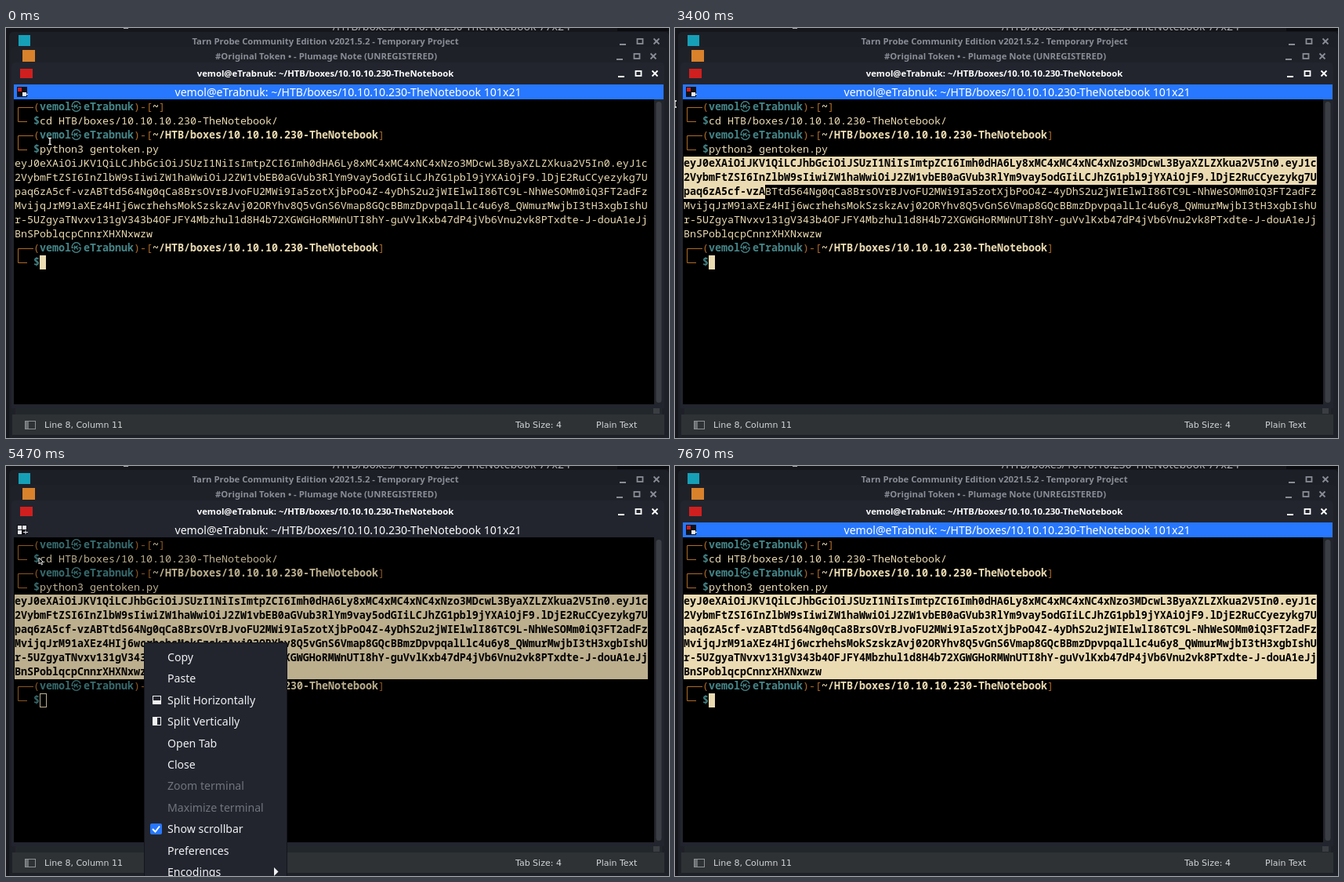
Animation of 846x523 px, one loop 8 s. Source, as an HTML page with a canvas:

```html
<!DOCTYPE html>
<html lang="en">
<head>
<meta charset="utf-8">
<title>Terminal selection</title>
<style>
html, body { margin: 0; width: 100%; height: 100%; overflow: hidden; background: #15171d; }
canvas { display: block; }
</style>
</head>
<body>
<canvas id="stage" width="846" height="523"></canvas>
<script>
const ctx = document.getElementById('stage').getContext('2d');
const LOOP = 8000, TICK = 1000 / 15;
const COLS = 101, CELL = 8, ROW = 18, LEFT = 11, TOP = 92;
const MONO = '"Noto Sans Mono", "DejaVu Sans Mono", monospace';
const SANS = '"Noto Sans", "Open Sans", sans-serif';
const STATUS = '11px "DejaVu Sans", sans-serif';
const CJK = '13.333px "Noto Sans CJK KR", "Noto Sans CJK JP", sans-serif';
const BLUE = '#2777ff', CHROME = '#22252e';

const USER = 'vemol', HOST = 'eTrabnuk', DIR = '~/HTB/boxes/10.10.10.230-TheNotebook';
const TITLE = `${USER}@${HOST}: ${DIR}`;
const TOKEN = [
  'eyJ0eXAiOiJKV1QiLCJhbGciOiJSUzI1NiIsImtpZCI6Imh0dHA6Ly8xMC4xMC4xNC4xNzo3MDcwL3ByaXZLZXkua2V5In0.eyJ1c',
  '2VybmFtZSI6InZlbW9sIiwiZW1haWwiOiJ2ZW1vbEB0aGVub3RlYm9vay5odGIiLCJhZG1pbl9jYXAiOjF9.lDjE2RuCCyezykg7U',
  'paq6zA5cf-vzABTtd564Ng0qCa8BrsOVrBJvoFU2MWi9Ia5zotXjbPoO4Z-4yDhS2u2jWIElwlI86TC9L-NhWeSOMm0iQ3FT2adFz',
  'MvijqJrM91aXEz4HIj6wcrhehsMokSzskzAvj02ORYhv8Q5vGnS6Vmap8GQcBBmzDpvpqalLlc4u6y8_QWmurMwjbI3tH3xgbIshU',
  'r-5UZgyaTNvxv131gV343b4OFJFY4Mbzhul1d8H4b72XGWGHoRMWnUTI8hY-guVvlKxb47dP4jVb6Vnu2vk8PTxdte-J-douA1eJj',
  'BnSPoblqcpCnnrXHXNxwzw'
];
const MENU = ['Copy', 'Paste', 'Split Horizontally', 'Split Vertically', 'Open Tab', 'Close',
  'Zoom terminal', 'Maximize terminal', 'Show scrollbar', 'Preferences', 'Encodings'];

const ACTIVE = { text: '#ebdbb2', line: '#ad6b29', name: '#458588' };
const IDLE = { text: '#bcaf8e', line: '#8a5621', name: '#376a6d' };

// Keys are [tick, x, y]; positions hold outside the ends.
const POINTER = [
  [4, 56, 144.5], [14, 24, 123.5], [21, 24, 123.5], [22, 17, 120.5], [23, -30, 80],
  [50, -30, 80], [51, 0, 97], [61, 48, 132.5], [64, 48, 132.5], [66, 52, 136.5],
  [67, 60, 139.5], [74, 60, 139.5], [80, 41, 114], [81, 41, 114], [82, 42, 117],
  [84, 42, 117], [88, 65, 129], [95, 65, 129], [96, 67, 132.5], [99, 67, 132.5],
  [102, 71, 108], [109, 14, -14]
];
// Keys are [tick, row, column] of the moving end of the second selection.
const DRAG = [
  [44, 4.2, 0], [48, 5.3, 11], [50, 5.3, 11], [51, 6.6, 13], [61, 8.3, 22], [64, 8.3, 22], [66, 8.6, 23]
];

function at(keys, k) {
  if (k <= keys[0][0]) return keys[0].slice(1);
  for (let i = 1; i < keys.length; i++) {
    const [t0, x0, y0] = keys[i - 1], [t1, x1, y1] = keys[i];
    if (k <= t1) {
      const f = (k - t0) / (t1 - t0);
      return [x0 + (x1 - x0) * f, y0 + (y1 - y0) * f];
    }
  }
  return keys[keys.length - 1].slice(1);
}

function rect(x, y, w, h, color) {
  ctx.fillStyle = color;
  ctx.fillRect(x, y, w, h);
}

function round(x, y, w, h, r, color) {
  ctx.fillStyle = color;
  ctx.beginPath();
  ctx.roundRect(x, y, w, h, r);
  ctx.fill();
}

function text(str, x, y, font, color, align = 'left') {
  ctx.font = font;
  ctx.fillStyle = color;
  ctx.textAlign = align;
  ctx.fillText(str, x, y);
}

function path(points, color, width = 1) {
  ctx.strokeStyle = color;
  ctx.lineWidth = width;
  ctx.beginPath();
  points.forEach(([x, y]) => ctx.lineTo(x, y));
  ctx.stroke();
}

function frameBox(x, y, w, h, color, width = 1) {
  ctx.strokeStyle = color;
  ctx.lineWidth = width;
  ctx.strokeRect(x, y, w, h);
}

function windowButtons(x, y, color) {
  rect(x - 4, y + 3, 8, 2, color);
  frameBox(x + 18.5, y - 3, 7, 6, color, 1.8);
  path([[x + 39.5, y - 3.5], [x + 46.5, y + 3.5]], color, 1.8);
  path([[x + 46.5, y - 3.5], [x + 39.5, y + 3.5]], color, 1.8);
}

function drawBackWindows() {
  rect(0, 0, 846, 523, '#14161b');
  rect(780, 0, 66, 4, '#0b0c0f');
  text(DIR + ' 77x24', 720, 3, '14.1px ' + SANS, '#a9abb0', 'right');
  rect(150, 0, 6, 1, '#a9abb0');

  round(4, 5, 842, 530, [5, 5, 0, 0], '#1d1f27');
  rect(16, 9, 15, 14, '#16a0b8');
  text('Tarn Probe Community Edition v2021.5.2 - Temporary Project', 407.5, 20.5, 'bold 11.3px ' + SANS, '#8a8d95', 'center');
  windowButtons(787, 17, '#8a8d95');

  round(6, 24, 838, 510, [5, 5, 0, 0], '#1f2129');
  rect(21, 28, 16, 15, '#d9822b');
  text('#Original Token • - Plumage Note (UNREGISTERED)', 408.5, 40, 'bold 11.3px ' + SANS, '#8a8d95', 'center');
  windowButtons(783, 36, '#8a8d95');

  rect(12, 484, 825, 10, '#22272b');
  rect(826, 484, 8, 8, '#3a3e42');
  rect(8, 493, 832, 26, '#2e3235');
  frameBox(24.5, 501.5, 13, 10, '#8c9093');
  rect(25, 502, 4, 9, '#6d7174');
  text('Line 8, Column 11', 49, 510, STATUS, '#d3d5d6');
  text('Tab Size: 4', 650, 510, STATUS, '#d3d5d6');
  text('Plain Text', 753, 510, STATUS, '#d3d5d6');
}

function drawTerminalFrame(focused) {
  round(7, 44, 833, 441, [5, 5, 0, 0], CHROME);
  rect(18, 52, 16, 12, '#d01f1f');
  text(TITLE, 407.5, 62, 'bold 11.3px ' + SANS, '#ffffff', 'center');
  windowButtons(785, 58, '#ffffff');

  rect(10, 72, 829, 19, focused ? BLUE : CHROME);
  const tiles = focused ? ['#d01f1f', '#101218', '#101218', '#e8eaf0'] : ['#e8eaf0', '#e8eaf0', '#e8eaf0', '#101218'];
  rect(14, 75, 13, 13, '#101218');
  tiles.forEach((color, i) => rect(15 + (i % 2) * 6, 76 + (i >> 1) * 6, 5, 5, color));
  path([[22, 84.5], [28, 84.5]], '#e8eaf0');
  path([[25, 82], [25, 87]], '#e8eaf0');
  text(TITLE + ' 101x21', 436.5, 87, '14.1px ' + SANS, '#ffffff', 'center');

  rect(10, 91, 817, 389, '#000000');
  rect(827, 91, 12, 389, '#22252b');
  round(829.5, 94, 7, 384, 3.5, '#3b3e44');
}

function cellText(str, row, col, color, weight = 'normal') {
  text(str, LEFT + col * CELL, TOP + row * ROW + 13, `${weight} 13.333px ${MONO}`, color);
}

function prompt(row, dir, pal) {
  const y = TOP + row * ROW + 9.5;
  path([[35, y], [15.5, y], [15.5, y + ROW], [27, y + ROW]], pal.line);
  const parts = [['(', 3], [USER, 4, 1], [HOST, 11, 1], [')-[', 19], [dir, 22, 2], [']', 22 + dir.length]];
  for (const [str, col, kind] of parts)
    cellText(str, row, col, kind === 1 ? pal.name : kind ? pal.text : pal.line, kind ? 'bold' : 'normal');
  text('㉿', LEFT + 9 * CELL, TOP + row * ROW + 13, CJK, pal.name);
  cellText('$', row + 1, 3, pal.name, 'bold');
}

function selection(k) {
  if (k >= 5 && k < 42) {
    const [x, y] = at(POINTER, Math.min(k, 14));
    return [y > 137.5 ? 9 : 8, Math.floor((x + 135 - LEFT) / CELL), 9, COLS];
  }
  if (k >= 67) return [4, 0, 9, COLS];
  if (k >= 45) {
    const [row, col] = at(DRAG, k);
    return [4, 0, Math.floor(row), Math.round(col)];
  }
  return null;
}

function drawSelection([r0, c0, r1, c1], pal) {
  for (let r = r0; r <= r1; r++) {
    const from = r === r0 ? c0 : 0, to = r === r1 ? c1 : COLS;
    ctx.save();
    ctx.beginPath();
    ctx.rect(LEFT + from * CELL, TOP + r * ROW, (to - from) * CELL, ROW);
    ctx.clip();
    rect(LEFT, TOP + r * ROW, COLS * CELL, ROW, pal.text);
    cellText(TOKEN[r - 4], r, 0, '#000000', '600');
    ctx.restore();
  }
}

function drawTerminal(k, focused) {
  const pal = focused ? ACTIVE : IDLE;
  prompt(0, '~', pal);
  cellText('cd HTB/boxes/10.10.10.230-TheNotebook/', 1, 4, pal.text);
  prompt(2, DIR, pal);
  cellText('python3 gentoken.py', 3, 4, pal.text);
  TOKEN.forEach((line, i) => cellText(line, 4 + i, 0, pal.text));
  prompt(10, DIR, pal);
  const range = selection(k);
  if (range) drawSelection(range, pal);
  if (!focused) frameBox(43.5, 290.5, 8, 17, pal.text);
  else if (k < 106 || k >= 115) rect(43, 290, 8, 18, pal.text);
}

function drawMenu(hover) {
  rect(176, 225, 183, 298, '#14161c');
  rect(177, 226, 181, 297, CHROME);
  if (hover >= 0) rect(178, 230.5 + hover * 27.4, 179, 27, BLUE);
  MENU.forEach((label, i) => {
    const off = i === 6 || i === 7;
    text(label, 206, 249 + i * 27.4, '14.1px ' + SANS, off ? '#70747d' : '#f0f1f3');
  });
  for (const [y, w, h] of [[293, 10, 6], [320, 5, 10]]) {
    rect(187, y, 11, 11, '#f0f1f3');
    rect(w > 5 ? 188 : 193, y + 1, w > 5 ? 9 : 4, w > 5 ? h - 1 : 9, CHROME);
  }
  round(184, 456, 15, 14, 2, BLUE);
  path([[187, 463], [190.5, 466.5], [196, 459.5]], '#ffffff', 2);
  ctx.fillStyle = '#f0f1f3';
  ctx.beginPath();
  ctx.moveTo(342, 512);
  ctx.lineTo(347.5, 517.5);
  ctx.lineTo(342, 523);
  ctx.fill();
}

function drawPointer([x, y], arrow) {
  ctx.save();
  ctx.translate(x, y);
  if (arrow) {
    ctx.beginPath();
    [[0, 0], [0, 8], [2, 6.3], [3.4, 9], [4.6, 8.4], [3.4, 5.8], [5.6, 5.5]].forEach(([a, b]) => ctx.lineTo(a, b));
    ctx.closePath();
    ctx.fillStyle = '#000000';
    ctx.fill();
    ctx.strokeStyle = '#ffffff';
    ctx.lineWidth = 0.9;
    ctx.stroke();
  } else {
    for (const [color, width] of [['#000000', 2.6], ['#ffffff', 1.3]]) {
      path([[-2, -4], [2, -4]], color, width);
      path([[0, -4], [0, 4]], color, width);
      path([[-2, 4], [2, 4]], color, width);
    }
  }
  ctx.restore();
}

function draw(k) {
  const menu = k >= 82 && k < 96;
  const focused = k < 82 || k >= 97;
  const pos = at(POINTER, k);
  drawBackWindows();
  drawTerminalFrame(focused);
  drawTerminal(k, focused);
  if (menu) drawMenu(k < 85 ? -1 : k === 86 || k === 87 ? 1 : 0);
  drawPointer(pos, menu || pos[1] < 72);
}

function loop() {
  const t = performance.now() % LOOP;
  draw(Math.floor((t + 4) / TICK) % 120);
  requestAnimationFrame(loop);
}
loop();
</script>
</body>
</html>
```
